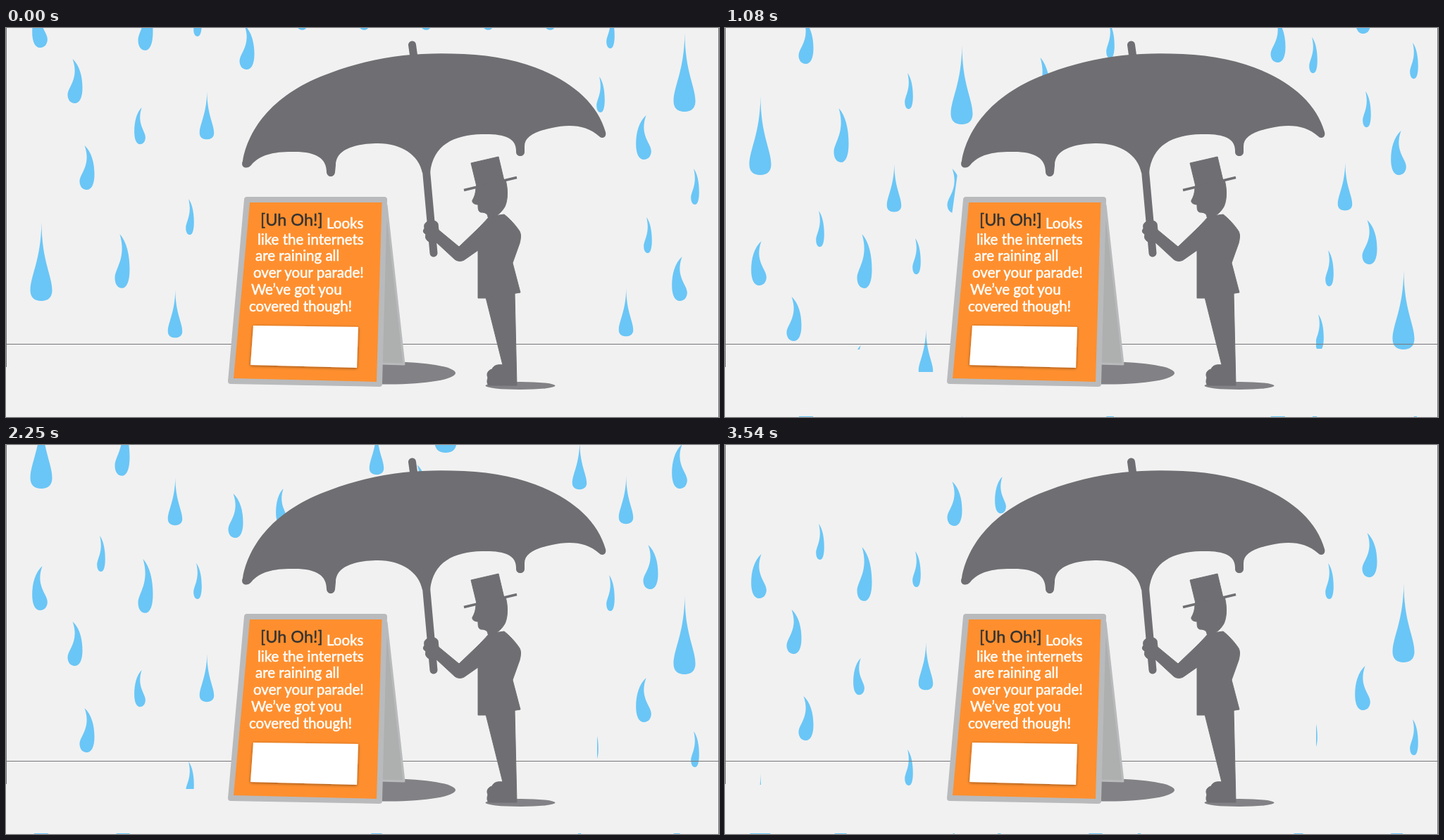
An HTML page for the animation above (3.57 s loop, 1012 px wide and 553 px high).

```html
<!DOCTYPE html>
<html lang="en">
<head>
<meta charset="utf-8">
<title>Rain on the parade</title>
<style>
  html, body { margin: 0; width: 100%; height: 100%; overflow: hidden; background: #f1f1f1; }
  svg { display: block; width: 100vw; height: 100vh; }
  text { font: 20.5px Lato, sans-serif; fill: #fff; stroke: #fff; stroke-width: .5px; }
  .big { font-size: 23.5px; fill: #333; stroke: #333; }
</style>
</head>
<body>
<svg viewBox="0 0 1012 553" preserveAspectRatio="none">
  <defs>
    <path id="straight" d="M16 0C16 55 31 76 31 97C31 107 25 112 15.500 112C6 112 0 107 0 97C0 76 15 55 16 0Z"/>
    <path id="curved" d="M7 0C17 9 21 25 21 41C21 55 17 63 10 63C4 63 0 58 0 51C0 40 17 28 7 0Z"/>
    <g id="batch"></g>
    <filter id="soft" x="-10%" y="-20%" width="120%" height="150%">
      <feDropShadow dx="0" dy="1" stdDeviation="2" flood-opacity=".45"/>
    </filter>
  </defs>

  <g id="rain" fill="#6ac6f6"></g>

  <!-- dry area: the ground and everything under the umbrella -->
  <path fill="#f1f1f1" d="M0 483H148V457H198V489H304L318 338L320 280L331 200L335 160H345L420 120L800 110L850 148V340L839 380V456H932V504H1012V552H0Z"/>
  <path d="M0 449.500H1012M.5 0V482M1011.500 0V553" fill="none" stroke="#77777a"/>

  <g fill="#828185">
    <ellipse cx="545" cy="490.500" rx="93" ry="16"/>
    <ellipse cx="730" cy="508.500" rx="49.500" ry="5.500"/>
  </g>

  <!-- umbrella -->
  <g fill="#6f6e72" stroke="#6f6e72" stroke-width="0" stroke-linecap="round">
    <path d="M336 189C344 143 380 92 460 64C530 38 590 34 650 37C750 41 833 83 851 148C853 156 845 158 842 154C825 138 800 136 775 142C750 147 736 155 736 168V176C736 184 724 184 724 176C725 155 705 150 675 151C636 152 606 166 602 206H591C586 180 560 163 525 164C490 165 468 175 468 195L467 205C466 213 456 213 455 205C455 185 440 175 405 176C380 176 360 180 348 195C342 202 332 198 336 189Z"/>
    <path d="M576.500 24L579 42M596.500 203L607 320" stroke-width="11"/>
  </g>

  <!-- gentleman -->
  <g fill="#6f6e72" stroke="#6f6e72" stroke-linejoin="round">
    <path d="M660 192L699 183L707 217L668 225Z"/>
    <path d="M650 230.500L725 212.500" stroke-width="3.500"/>
    <path d="M667 225L709 216C713 230 712 246 708 254C704 261 700 264 695 268L684 269C684 264 680 262 674 262C670 261 670 256 670 251C666 251 661 249 662 245C665 240 667 234 667 225Z"/>
    <path d="M686 268L707 265C714 270 724 281 729 289C731 293 731 298 729 306L719 334L730 376L681 384H670V316L650 330C646 332 641 332 637 329L610 304L614 287L643 311L668 287C674 281 679 276 686 268Z"/>
    <path d="M597 276C601 272 611 273 613 278L615 296C613 304 604 306 599 303C595 300 595 296 596 293C591 291 592 287 594 285C593 280 594 278 597 276Z"/>
    <path d="M681 383L722 376L725 508H685C682 505 683 500 684 497C681 491 685 486 690 485C692 479 699 478 705 479Z"/>
  </g>

  <!-- sandwich board -->
  <path d="M540 252L565 478L530 477Z" fill="#aeafaf" stroke="#b9babc" stroke-width="3" stroke-linejoin="round"/>
  <path d="M342 244H537L530 506L319 502Z" fill="#b9babc" stroke="#b9babc" stroke-width="8" stroke-linejoin="round"/>
  <path d="M346 248H533.500L526 503L323 498Z" fill="#ff8f2e"/>
  <path d="M351 423L500 425L498 483L347 479Z" fill="#fff" filter="url(#soft)"/>
  <text x="361" y="281" class="big">[Uh Oh!]</text>
  <text x="455" y="285">Looks</text>
  <text x="357" y="308">like the internets</text>
  <text x="354" y="331">are raining all</text>
  <text x="351" y="355">over your parade!</text>
  <text x="348" y="379">We’ve got you</text>
  <text x="345" y="403">covered though!</text>
</svg>
<script>
const LOOP = 3570, STEP = 30, SPEED = 0.7853;
// Height of each batch of drops at the start of the loop
const starts = [276, -234, -751, -1284, -1817, -2314];

// Size of each kind of drop relative to its shape
const kinds = {
  big:   { shape: 'straight', sx: 1, sy: 1 },
  mid:   { shape: 'straight', sx: 0.66, sy: 0.61 },
  plain: { shape: 'curved', sx: 1, sy: 1 },
  tall:  { shape: 'curved', sx: 1, sy: 1.22 },
  small: { shape: 'curved', sx: 0.55, sy: 0.81 },
  left:  { shape: 'curved', sx: -1.03, sy: 1 },
  leftSmall: { shape: 'curved', sx: -0.75, sy: 0.83 }
};

function addUse(parent, id, transform) {
  const use = document.createElementNS('http://www.w3.org/2000/svg', 'use');
  use.setAttribute('href', '#' + id);
  if (transform) use.setAttribute('transform', transform);
  return parent.appendChild(use);
}

// x is the middle of the drop, y its tip
const batch = document.getElementById('batch');
function addDrop(kind, x, y) {
  const { shape, sx, sy } = kinds[kind];
  const middle = shape === 'straight' ? 15.5 : 10.5;
  addUse(batch, shape, `translate(${x - sx * middle} ${y}) scale(${sx} ${sy})`);
}

// One cluster repeats across the sky
for (const [x, y] of [[50, 0], [336, -72], [624, -51]]) {
  addDrop('big', x, y);
  addDrop('tall', x + 115, y + 17);
  addDrop('mid', x + 190, y + 96);
  addDrop('small', x + 211, y - 33);
  addDrop('plain', x + 65, y - 109);
}

// Two staggered rows, mostly behind the umbrella
for (let i = 0; i < 9; i++) {
  addDrop(i % 2 ? 'plain' : 'tall', 421 + 44 * i, i % 2 ? -210 : -350);
}

// Loose drops at the sides
const loose = {
  big: [[963, -269]],
  mid: [[285, -186], [880, 94]],
  plain: [[98, -232], [326, -414], [342, -280], [587, 78], [785, -111], [915, -341]],
  tall: [[198, -321]],
  small: [[135, -354], [272, -315], [844, -207], [858, -298], [911, -7], [978, -76]],
  left: [[48, -311], [905, -152], [956, 49]],
  leftSmall: [[190, -163], [391, -421]]
};
for (const kind in loose) loose[kind].forEach(([x, y]) => addDrop(kind, x, y));

const rain = document.getElementById('rain');
const batches = starts.map(() => addUse(rain, 'batch'));

function draw(now) {
  const t = Math.floor((now % LOOP) / STEP) * STEP;
  batches.forEach((b, i) => b.setAttribute('transform', `translate(0 ${starts[i] + SPEED * t})`));
}

const begin = performance.now();
function tick() {
  draw(performance.now() - begin);
  requestAnimationFrame(tick);
}
tick();
</script>
</body>
</html>
```
